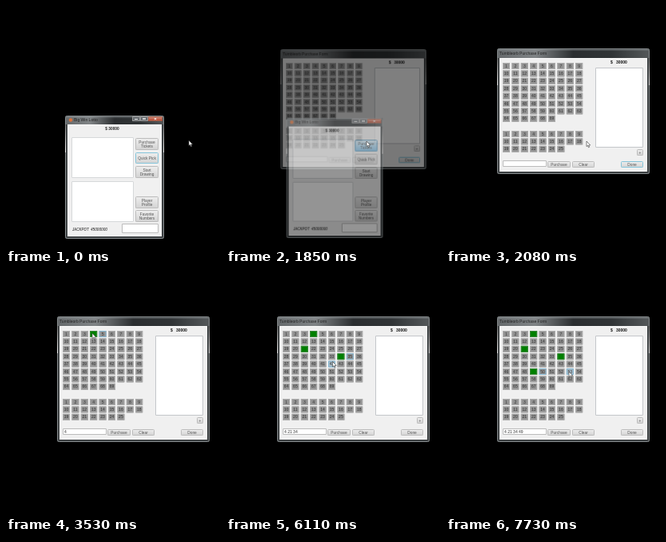
Recreate the animation shown at these times as an HTML page with a canvas. Size 268 by 300 pixels, loop 8000 ms.

```html
<!DOCTYPE html>
<html lang="en">
<head>
<meta charset="utf-8">
<title>Lottery ticket purchase</title>
<style>
  html, body { margin: 0; height: 100%; overflow: hidden; background: #000; }
  canvas { display: block; width: 100vw; height: 100vh; }
</style>
</head>
<body>
<canvas id="stage" width="268" height="300"></canvas>
<script>
const stage = document.getElementById('stage').getContext('2d');
const layerCanvas = document.createElement('canvas');
layerCanvas.width = 268;
layerCanvas.height = 300;
const layer = layerCanvas.getContext('2d');
let ctx = stage;

const LOOP = 8000;
const FONT = '"Liberation Sans", Arial, sans-serif';
const COLS = 9, PITCH_X = 11.4, PITCH_Y = 9.4;

// Cursor moves: start ms, end ms, steps, x, y reached at the end
const moves = [
  [530, 1060, 8, 176, 169],
  [2300, 2840, 8, 104, 74],
  [2990, 3300, 5, 108, 74],
  [3700, 3930, 4, 97, 93],
  [4080, 4230, 3, 98, 99],
  [4400, 4550, 3, 97, 94],
  [4780, 5480, 10, 141, 106],
  [5580, 5630, 2, 142, 105],
  [5880, 6580, 9, 109, 122],
  [6880, 7040, 3, 111, 121],
  [7190, 7730, 8, 154, 122]
];
const picks = [
  { number: 4, at: 3450 }, { number: 21, at: 4700 },
  { number: 34, at: 5800 }, { number: 49, at: 6650 }
];
const CLICK_TIME = 78;
const OPEN_START = 1768, OPEN_STEPS = 4, STEP_TIME = 77.5;

const clamp = v => Math.max(0, Math.min(1, v));
const ease = p => p * p * (3 - 2 * p);

function cursorAt(t) {
  let x = 229, y = 168;
  for (const [start, end, steps, toX, toY] of moves) {
    if (t < start) break;
    const step = Math.floor((t - start) * (steps - 1) / (end - start) + 0.05) + 1;
    const p = ease(clamp(step / steps));
    x += (toX - x) * p;
    y += (toY - y) * p;
  }
  return { x, y };
}

function box(x, y, w, h, fill, stroke, radius = 0) {
  ctx.fillStyle = fill;
  ctx.beginPath();
  ctx.roundRect(x, y, w, h, radius);
  ctx.fill();
  if (stroke) {
    ctx.strokeStyle = stroke;
    ctx.lineWidth = 1;
    ctx.beginPath();
    ctx.roundRect(x + 0.5, y + 0.5, w - 1, h - 1, radius);
    ctx.stroke();
  }
}

function text(str, x, y, size = 5, color = '#222', align = 'left', style = '') {
  ctx.font = `${style} ${size}px ${FONT}`;
  ctx.fillStyle = color;
  ctx.textAlign = align;
  ctx.textBaseline = 'middle';
  ctx.fillText(str, x, y);
}

function gradient(x0, y0, x1, y1, ...colors) {
  const g = ctx.createLinearGradient(x0, y0, x1, y1);
  colors.forEach((c, i) => g.addColorStop(i / (colors.length - 1), c));
  return g;
}

function button(label, x, y, w, h, state) {
  const hot = state === 'hover';
  const fill = hot ? gradient(0, y, 0, y + h, '#e2f3fc', '#7dbfe8')
                   : gradient(0, y, 0, y + h, '#efefef', '#d2d2d2');
  box(x, y, w, h, fill, hot ? '#5f9dc2' : state === 'focus' ? '#84c4da' : '#bcbcbc', 1);
  const lines = label.split('\n');
  lines.forEach((line, i) =>
    text(line, x + w / 2, y + h / 2 + (i - (lines.length - 1) / 2) * 5 + 0.3, 4.8, '#555', 'center'));
}

function windowFrame(x, y, w, h, titleHeight) {
  box(x, y, w, h, '#3c4042', '#858a8c', 2);
  box(x + 1, y + 1, w - 2, titleHeight - 1,
    gradient(x, 0, x + w, 0, '#65696b', '#808486', '#2b2e30', '#303436', '#55595b'));
  box(x + 1, y + 1, w - 2, 2, 'rgba(150,156,160,.3)');
  const shine = gradient(0, y + titleHeight, 0, y + 46, '#777', '#eee');
  for (const side of [x, x + w - 1]) box(side, y + titleHeight, 1, 46 - titleHeight, shine);
  box(x + 3, y + titleHeight, w - 6, h - titleHeight - 3, '#f0f0f0', '#fafafa');
}

function drawMain(t) {
  windowFrame(74, 137, 124, 154, 11);
  ctx.fillStyle = '#d9713c';
  ctx.beginPath();
  ctx.arc(81, 142.5, 2.2, 0, 7);
  ctx.fill();
  text('Big Win Lotto', 85, 142.5, 5, '#222');
  box(158, 138, 10, 6, '#666b6f', '#999');
  box(168, 138, 10, 6, '#666b6f', '#999');
  box(178, 138, 18, 6, gradient(0, 138, 0, 144, '#d99a88', '#b03a22'), '#a0604c', 1);
  box(161, 141, 4, 1, '#eee');
  box(171, 140, 4, 2, '#ccc');
  text('×', 187, 141, 6, '#fff', 'center', 'bold');

  text('$ 30000', 133, 154, 4.8, '#222', 'center', 'bold');
  box(82, 164, 78, 51, '#fff', '#d6d8da');
  box(82, 219, 78, 51, '#fff', '#d6d8da');
  button('Purchase\nTickets', 162, 165, 29, 15, t >= 980 ? 'hover' : '');
  button('Quick Pick', 162, 183, 29, 14, t < 1690 ? 'focus' : '');
  button('Start\nDrawing', 162, 200, 29, 15);
  button('Player\nProfile', 162, 238, 29, 15);
  button('Favorite\nNumbers', 162, 255, 29, 15);
  text('JACKPOT', 83, 279.5, 4.5, '#111', 'left', 'italic');
  text('45000000', 106, 279.5, 4.7, '#111', 'left', 'italic');
  box(145, 272, 46, 12, '#fff', '#bbb');
}

function drawCells(count, top, cursor, picked = [], focused = 0) {
  for (let n = 1; n <= count; n++) {
    const x = 71 + (n - 1) % COLS * PITCH_X;
    const y = top + Math.floor((n - 1) / COLS) * PITCH_Y;
    const hover = cursor.x >= x && cursor.x < x + 9.5 && cursor.y >= y && cursor.y < y + 8;
    if (picked.includes(n)) {
      box(x, y, 9, 8, '#008000', '#3c873c');
      continue;
    }
    const lit = hover || n === focused;
    box(x, y, 9, 8, hover ? '#a8bcc8' : '#929292', lit ? '#83b6d2' : '#adadad');
    text(n, x + 4.5, y + 4.2, 5, '#333', 'center');
  }
}

function drawPurchase(t, cursor) {
  const picked = picks.filter(p => t >= p.at + CLICK_TIME).map(p => p.number);
  const last = picked[picked.length - 1];

  windowFrame(64, 53, 191, 157, 12);
  text('Tumbleorb Purchase Form', 67, 59.5, 5, '#222');
  text('$', 206, 70.5, 5, '#111', 'left', 'bold');
  text('30000', 213, 70.5, 5, '#111', 'left', 'bold');
  drawCells(69, 71, cursor, picked, last ? last + 1 : 0);
  drawCells(25, 156, cursor);
  box(187, 77, 60, 100, '#fff', '#c4c7ca');
  button('+', 239, 179, 8, 8);
  box(71, 193, 55, 8, '#fff', '#bbb');
  text(picked.join(' '), 73, 197.3, 5, '#333');
  button('Purchase', 127, 194, 29, 8);
  button('Clear', 158, 194, 28, 8);
  button('Done', 219, 194, 28, 8, last ? '' : 'focus');
}

// Draw a window as one layer, shrunk towards a point as it fades
function faded(alpha, cx, cy, shrink, drawWindow) {
  if (alpha <= 0) return;
  const scale = 1 - shrink * (1 - alpha);
  layer.clearRect(0, 0, 268, 300);
  ctx = layer;
  drawWindow();
  ctx = stage;
  ctx.save();
  ctx.globalAlpha = alpha;
  ctx.translate(cx, cy);
  ctx.scale(scale, scale);
  ctx.drawImage(layerCanvas, -cx, -cy);
  ctx.restore();
}

const cursorShape = new Path2D('M0 0V6.6L1.5 5.3L2.5 7.8L3.6 7.3L2.6 5H4.7Z');

function drawCursor({ x, y }, clicking) {
  if (clicking) {
    ctx.fillStyle = 'rgba(255,235,30,.8)';
    ctx.beginPath();
    ctx.arc(x, y + 1, 4.5, 0, 7);
    ctx.fill();
  }
  ctx.save();
  ctx.translate(x, y);
  ctx.fillStyle = '#fff';
  ctx.strokeStyle = '#333';
  ctx.lineWidth = 0.6;
  ctx.fill(cursorShape);
  ctx.stroke(cursorShape);
  ctx.restore();
}

function draw(t) {
  const cursor = cursorAt(t);
  const p = clamp(Math.floor((t - OPEN_START) / STEP_TIME + 0.05) / OPEN_STEPS);
  box(0, 0, 268, 300, '#000');
  faded(1 - (1 - p) ** 2.4, 159.5, 76, 0.09, () => drawPurchase(t, cursor));
  faded((1 - p) ** 1.9, 136.5, 250, 0.06, () => drawMain(t));
  const clicking = [1690, ...picks.map(pick => pick.at)]
    .some(at => t >= at && t < at + CLICK_TIME);
  drawCursor(cursor, clicking);
}

function frame() {
  draw(performance.now() % LOOP);
  requestAnimationFrame(frame);
}
frame();
</script>
</body>
</html>
```
